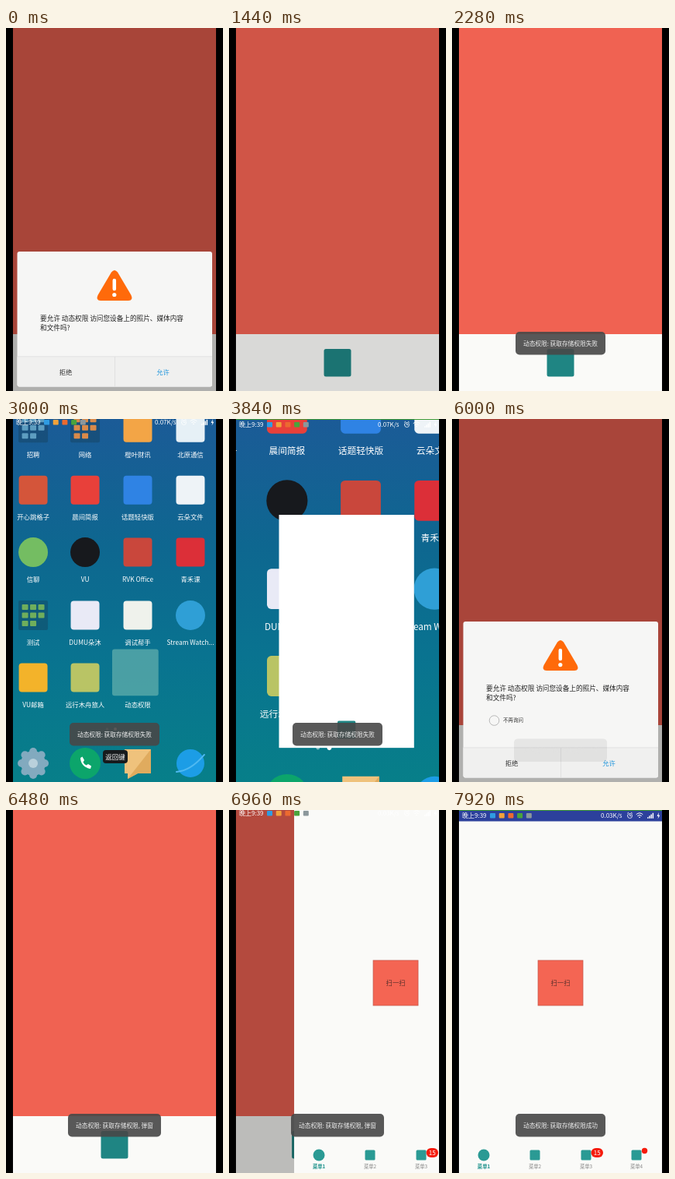
Recreate the animation shown at these times as an HTML page with a canvas. Size 280x466 px, loop 8 s.

```html
<!DOCTYPE html>
<html lang="zh">
<head>
<meta charset="utf-8">
<style>
  html, body { margin: 0; width: 100%; height: 100%; overflow: hidden; background: #000; }
  canvas { display: block; width: 280px; height: 466px; }
</style>
</head>
<body>
<canvas></canvas>
<script>
const W = 280, H = 466, LEFT = 9, SCREEN = 262, LOOP = 8000;
const FONT = '"Noto Sans CJK SC", "Noto Sans CJK", "Noto Sans", sans-serif';
const TEAL = '#1f8583', CORAL = '#f06252', PAPER = '#fafaf8';

const canvas = document.querySelector('canvas');
const ratio = window.devicePixelRatio || 1;
canvas.width = W * ratio;
canvas.height = H * ratio;
const c = canvas.getContext('2d');

const clamp = v => Math.max(0, Math.min(1, v));
const span = (t, start, length) => clamp((t - start) / length);
const easeOut = (p, power = 3) => 1 - (1 - p) ** power;
const mix = (a, b, p) => a + (b - a) * p;

function rect(x, y, w, h, color) {
  c.fillStyle = color;
  c.fillRect(x, y, w, h);
}

function round(x, y, w, h, r, color) {
  c.fillStyle = color;
  c.beginPath();
  c.roundRect(x, y, w, h, r);
  c.fill();
}

function disc(x, y, r, color) {
  c.fillStyle = color;
  c.beginPath();
  c.arc(x, y, r, 0, 7);
  c.fill();
}

function shape(d, color, line) {
  const path = new Path2D(d);
  c.fillStyle = c.strokeStyle = color;
  c.lineWidth = line || 1;
  c.lineCap = c.lineJoin = 'round';
  line ? c.stroke(path) : c.fill(path);
}

function text(s, x, y, size, color, align = 'center', weight = 400) {
  c.font = `${weight} ${size}px ${FONT}`;
  c.textAlign = align;
  c.textBaseline = 'alphabetic';
  c.fillStyle = color;
  c.fillText(s, x, y + size * 0.37);
}

function layer(draw, alpha = 1) {
  if (alpha <= 0) return;
  c.save();
  c.globalAlpha *= alpha;
  draw();
  c.restore();
}

// --- Home screen -------------------------------------------------------

const COLUMNS = [35, 102, 170, 238];
const ROWS = [11, 91, 171, 252, 332];
const APPS = [
  ['招聘', 'folder', '#5d9dc0'], ['网络', 'folder', '#d98a4a'],
  ['橙叶财讯', 'square', '#f3a546'], ['北原通信', 'square', '#e6f0f6'],
  ['开心跳格子', 'square', '#d4553a'], ['晨间简报', 'square', '#e8403a'],
  ['话题轻快版', 'square', '#2f83e4'], ['云朵文件', 'square', '#eef3f7'],
  ['信聊', 'circle', '#74bd62'], ['VU', 'circle', '#17191d'],
  ['RVK Office', 'square', '#c9473c'], ['青禾课', 'square', '#dc2f38'],
  ['测试', 'folder', '#6fae5c'], ['DUMU朵沐', 'square', '#e9eaf6'],
  ['调试帮手', 'square', '#eff2ec'], ['Stream Watch...', 'circle', '#2f9fd6'],
  ['VU邮箱', 'square', '#f3b32a'], ['远行木舟旅人', 'square', '#b9c465'],
  ['动态权限', 'app', TEAL]
];

function folder(x, y, color) {
  round(x - 19, y - 19, 38, 38, 2, 'rgba(20,60,85,.4)');
  for (let i = 0; i < 8; i++)
    round(x - 14.5 + i % 3 * 10.5, y - 14 + Math.floor(i / 3) * 10.5, 8, 7, 1, color);
}

function dock() {
  const y = 442;
  for (let i = 0; i < 8; i++) {
    const a = i * Math.PI / 4;
    disc(35 + 15 * Math.cos(a), y + 15 * Math.sin(a), 5, '#82aabf');
  }
  disc(35, y, 16, '#82aabf');
  disc(35, y, 6, '#b9d0db');
  disc(102, y, 20, '#0ca56b');
  shape('M96 435 C96 442 101 448 109 449 L110 445.5 L106 443 L103.5 444.5 Q100.5 443 99.5 440.5 L101 438 L98.5 433.5Z', '#fff');
  shape('M153 424H187V455H170L157 462V455H153Z', '#efc27c');
  shape('M187 424V455H170L157 462Z', '#e0ab5e');
  disc(238, y, 18, '#1c9de6');
  shape('M220 453 Q238 452 256 431', '#4fb9f1', 2);
}

function home(p, iconVisible) {
  const wall = c.createLinearGradient(0, 0, 0, H);
  wall.addColorStop(0, '#1b5b97');
  wall.addColorStop(0.35, '#0e6790');
  wall.addColorStop(0.65, '#097390');
  wall.addColorStop(1, '#077f89');
  rect(LEFT, 0, SCREEN, H, wall);
  layer(() => {
    const zoom = (1 + 0.86 * p) / 1.091;
    c.translate(170, 337);
    c.scale(zoom, zoom);
    c.translate(-170, -337);
    APPS.forEach(([label, kind, color], i) => {
      const x = COLUMNS[i % 4], y = ROWS[Math.floor(i / 4)];
      if (kind === 'folder') folder(x, y, color);
      else if (kind === 'circle') disc(x, y, 19, color);
      else if (kind === 'square' || iconVisible) round(x - 18.5, y - 18.5, 37, 37, 4, color);
      text(label, x, y + 34.5, 8.4, '#fff', 'center', 300);
    });
    disc(130.5, 398, 1.6, 'rgba(255,255,255,.5)');
    disc(141, 398, 2, '#fff');
    dock();
  });
}

// --- App screens -------------------------------------------------------

function splash(withImage) {
  rect(LEFT, 0, SCREEN, H, withImage ? PAPER : '#fff');
  if (withImage) rect(LEFT, 0, SCREEN, 393, CORAL);
  round(122.5, 412, 35, 35.5, 2.5, TEAL);
}

// The app window grows out of a square launcher tile.
function appWindow(p, withImage, contentAlpha) {
  const w = mix(36, SCREEN, p), h = mix(36, H, p);
  const x = mix(170, 140, p), y = mix(335, 233, p);
  layer(() => round(x - w / 2, y - w / 2 + 1, w, w, 3, '#5aabab'), 0.8 * (1 - contentAlpha));
  layer(() => {
    c.translate(x - w / 2, y - h / 2);
    c.scale(w / SCREEN, h / H);
    c.translate(-LEFT, 0);
    splash(withImage);
  }, contentAlpha);
}

function mainPage(offset, barAlpha) {
  layer(() => {
    c.translate(offset, 0);
    rect(LEFT, 0, SCREEN, H, PAPER);
    rect(111, 193, 58, 58, '#f46553');
    c.strokeStyle = '#c2574a';
    c.lineWidth = 0.7;
    c.strokeRect(111, 193, 58, 58);
    text('扫一扫', 140, 222, 8.3, '#5b302b');
    [41, 107, 173, 238].forEach((x, i) => {
      if (i) round(x - 6.5, 436.5, 13, 13, 1.5, '#2a9a94');
      else disc(x, 443, 7.5, '#2a9a94');
      text('菜单' + (i + 1), x, 458, 6.3, i ? '#858585' : '#1f938c', 'center', i ? 400 : 700);
    });
    round(179.5, 434, 15.5, 12, 6, '#f51b0c');
    text('15', 187.2, 440, 8, '#fff');
    disc(248.5, 437.5, 3.7, '#f51b0c');
  });
  layer(() => rect(LEFT, 0, SCREEN, 14.5, '#2c409c'), barAlpha);
}

function statusBar(speed, shown) {
  layer(() => {
    c.translate(0, -14 * (1 - easeOut(shown)));
    text('晚上9:39', 13, 7.5, 8, '#fff', 'left');
    ['#2f9ce2', '#f2a23a', '#ec6a30', '#4aa33c', '#8b979c'].forEach((color, i) =>
      round(49 + i * 11.7, 4, 7, 6.5, 1, color));
    text(speed, 192, 7.5, 8, '#fff', 'left');
    shape('M226.5 7.5a3 3 0 1 0 6 0a3 3 0 1 0-6 0M229.5 5.7V7.5H231M226.5 4.2L227.7 3.2M232.5 4.2L231.3 3.2', '#fff', 0.8);
    shape('M238 5.5Q242 2 246 5.5M239.6 7.4Q242 5.3 244.4 7.4M241.3 9.3Q242 8.7 242.7 9.3', '#fff', 1);
    for (let i = 0; i < 4; i++) rect(252 + i * 2.2, 9.2 - i * 1.8, 1.5, 1.6 + i * 1.8, '#fff');
    shape('M267 3L264.5 8H266.3L265.5 11.5L268.3 6.7H266.5Z', '#fff');
  }, shown > 0 ? 1 : 0);
  if (shown >= 1) rect(LEFT, 0, SCREEN, 1, '#3f9a35');
}

// --- Overlays ----------------------------------------------------------

function dialog(top, slide, repeat) {
  layer(() => {
    c.translate(0, slide);
    round(14.5, top, 251.5, 460.5 - top, 3, '#f6f6f5');
    round(14.5, 422, 251.5, 38.5, [0, 0, 3, 3], '#f0f0ef');
    rect(14.5, 421.5, 251.5, 0.8, '#dcdcdc');
    rect(140, 422, 0.8, 38.5, '#dcdcdc');
    text('拒绝', 77, 441.5, 8.3, '#333');
    text('允许', 202.5, 441.5, 8.3, '#2196dc');
    if (repeat) {
      c.strokeStyle = '#aaa';
      c.lineWidth = 0.8;
      c.beginPath();
      c.arc(54.5, 387, 6.3, 0, 7);
      c.stroke();
      text('不再询问', 66, 387, 6.5, '#333', 'left');
    }
    c.translate(0, top);
    shape('M136 26.5Q140 21.5 144 26.5L161.5 56Q164.5 62.5 158 63H122Q115.5 62.5 118.5 56Z', '#ff6a0a');
    shape('M139.8 37V48', '#fff', 4.5);
    disc(139.8, 55.5, 2.6, '#fff');
    text('要允许 动态权限 访问您设备上的照片、媒体内容', 44, 86, 8.65, '#222', 'left');
    text('和文件吗?', 44, 97.7, 8.65, '#222', 'left');
  });
}

function permission(t, opens, closes, top, repeat) {
  if (t < opens || t > closes + 430) return;
  const shown = easeOut(span(t, opens, 360));
  const gone = span(t, closes, 240);
  rect(LEFT, 0, SCREEN, H, `rgba(0,0,0,${0.3 * shown * (1 - span(t, closes, 430))})`);
  dialog(top, (H - top) * Math.max(1 - shown, gone ** 1.5), repeat);
}

function toast(t, start, end, message, halfWidth) {
  const shown = span(t, start, 300);
  layer(() => {
    c.translate(0, 24 * (1 - shown) ** 1.5);
    round(140 - halfWidth, 390, halfWidth * 2, 29.5, 5, 'rgba(72,72,72,.9)');
    text(message, 140, 405, 7.7, '#eee', 'center', 300);
  }, shown * (1 - span(t, end, 200)));
}

function touch(t, start, x) {
  if (t >= start && t < start + 240) disc(x, 442, 8.5, 'rgba(120,120,120,.45)');
}

function backHint(t) {
  layer(() => {
    round(125, 425, 32, 17, 4, '#171b1d');
    text('返回键', 141, 433.5, 8.5, '#fff');
  }, span(t, 2600, 80) * (1 - span(t, 3120, 200)));
}

// --- Timeline ----------------------------------------------------------

function background(t) {
  if (t < 2700) {
    splash(true);
  } else if (t < 3660) {
    const p = 1 - easeOut(span(t, 2700, 570));
    home(p, p === 0);
    if (p > 0) appWindow(p, true, clamp((p - 0.12) / 0.4));
    statusBar('0.07K/s', span(t, 2880, 300));
  } else if (t < 4260) {
    const p = easeOut(span(t, 3660, 480), 2);
    home(p, false);
    appWindow(p, false, clamp(p / 0.3));
    statusBar('0.07K/s', 1);
  } else {
    const slide = easeOut(span(t, 6840, 355));
    layer(() => {
      c.translate(-58 * slide, 0);
      splash(true);
    });
    if (t < 6840) return;
    rect(LEFT, 0, SCREEN, H, `rgba(0,0,0,${0.35 * slide})`);
    mainPage(SCREEN * (1 - slide), span(t, 7190, 120));
    statusBar('0.03K/s', span(t, 6840, 300));
  }
}

function draw(t) {
  c.setTransform(ratio, 0, 0, ratio, 0, 0);
  rect(0, 0, W, H, '#000');
  layer(() => {
    c.beginPath();
    c.rect(LEFT, 0, SCREEN, H);
    c.clip();
    background(t);
    permission(t, -1000, 1200, 287, false);
    permission(t, 4440, 6000, 260, true);
    touch(t, 720, 98.5);
    touch(t, 5520, 203);
    toast(t, 1780, 4000, '动态权限: 获取存储权限失败', 58);
    toast(t, 5970, 7260, '动态权限: 获取存储权限, 弹窗', 60);
    toast(t, 7440, 9000, '动态权限: 获取存储权限成功', 58);
    backHint(t);
  });
}

function tick() {
  draw(performance.now() % LOOP);
  requestAnimationFrame(tick);
}
tick();
</script>
</body>
</html>
```
